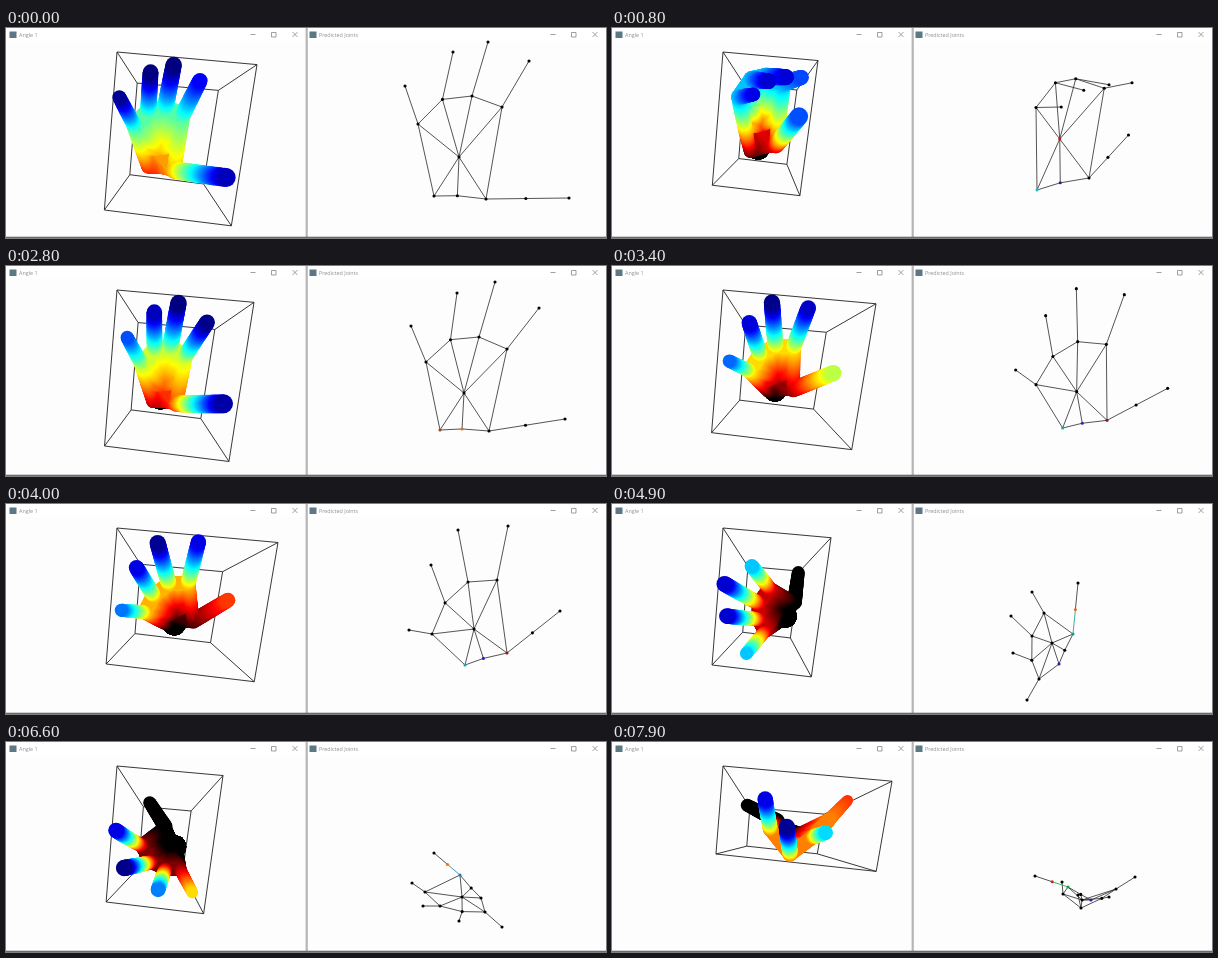
Animation, 600 px wide and 210 px high, one loop 8000 ms. Source, as an HTML page with a canvas:

```html
<!DOCTYPE html>
<html lang="en">
<head>
<meta charset="utf-8">
<title>Hand pose</title>
<style>
  html, body { margin: 0; width: 600px; height: 210px; overflow: hidden; background: #fdfdfd; }
  svg, canvas { position: absolute; left: 0; top: 0; width: 600px; height: 210px; }
  text { font: 5.4px "Open Sans", "Noto Sans", sans-serif; fill: #8c8c8c; }
  .icon { fill: #5c7884; }
  .buttons { fill: none; stroke: #777; stroke-width: .7; }
</style>
</head>
<body>
<svg viewBox="0 0 600 210">
  <defs>
    <g id="bar">
      <rect width="300" height="13" fill="#fff"/>
      <rect class="icon" x="3.5" y="3.5" width="7" height="6.5"/>
      <path class="buttons" d="M244.5 6.5h5M265.5 4.5h4.500v4.500h-4.500zM286.5 4l5 5m0-5l-5 5"/>
    </g>
  </defs>
  <use href="#bar"/>
  <use href="#bar" x="300"/>
  <text x="13" y="8.8">Angle 1</text>
  <text x="313" y="8.8">Predicted Joints</text>
  <rect x="299.5" width="1" height="209" fill="#c4c4c4"/>
  <rect x="300.5" width="1" height="209" fill="#8a8a8a"/>
  <rect y="208.7" width="600" height="1.3" fill="#6b6b6b"/>
</svg>
<canvas id="view" width="600" height="210"></canvas>
<script>
const ctx = document.getElementById('view').getContext('2d');
const LOOP = 8000, STEP = 100;

// hold: first and last ms of the pose. box: width, height, scale of the far side.
// fit: area that the hand fills. depth: five tips, knuckles, palm.
// joints: outer and inner heel, centre, pinky, middle and index knuckle, tips pinky to thumb.
const poses = [
  {
    hold: [0, 200], box: [140, 158, .58], fit: [113, 37, 221, 151],
    depth: [.02, 0, 0, .12, .06, .46, .72],
    joints: [428,168, 480,171, 453,129, 412,96, 466,68, 496,79,
             399,58, 447,24, 482,14, 523,33, 563,170],
    tint: {}
  },
  {
    hold: [1000, 1800], box: [80, 125, .54], fit: [126, 45, 180, 124],
    depth: [.13, .11, .12, .22, .25, .27, .97],
    joints: [424,160, 476,143, 446,105, 428,74, 463,45, 491,54,
             466,86, 480,75, 502,71, 519,62, 501,86],
    tint: { heel: '#12c8d8', midHeel: '#2020a0', centre: '#c01818' }
  },
  {
    hold: [2600, 2800], box: [137, 156, .56], fit: [118, 37, 218, 147],
    depth: [.2, .06, 0, .01, .04, .58, .83],
    joints: [434,164, 483,165, 458,127, 420,96, 473,71, 501,83,
             405,60, 451,27, 489,16, 533,42, 559,153],
    tint: { heel: '#a04818', midHeel: '#c87838' }
  },
  {
    hold: [3700, 4100], box: [161, 136, .51], fit: [111, 36, 236, 130],
    depth: [.24, .1, .02, .1, .82, .7, 1.06],
    joints: [459,161, 501,149, 468,125, 426,130, 462,78, 491,76,
             403,126, 425,61, 452,26, 502,22, 554,107],
    tint: { heel: '#18a8a0', midHeel: '#2828b0', thumbBase: '#802020' }
  },
  {
    hold: [4900, 4900], box: [108, 137, .48], fit: [111, 50, 192, 154],
    depth: [.32, .08, .08, .32, 1.2, .93, 1.16],
    joints: [447,160, 461,130, 440,139, 427,175, 420,132, 432,109,
             415,196, 401,149, 399,112, 420,88, 466,79],
    tint: { heel: '#2020c0', thumbBase: '#189888', thumb: '#e06820' }
  },
  {
    hold: [6600, 6600], box: [106, 136, .45], fit: [108, 38, 189, 161],
    depth: [.66, .25, .01, .1, 1.2, 1, 1.2],
    joints: [475,156, 454,133, 456,155, 479,170, 434,164, 419,150,
             496,185, 453,179, 417,164, 406,141, 428,111],
    tint: { thumbBase: '#1878b8', thumb: '#e87820' }
  },
  {
    hold: [7800, LOOP], box: [169, 88, .44], fit: [115, 42, 254, 114],
    depth: [.83, .34, .02, .1, 1.2, .75, 1.15],
    joints: [479,158, 456,145, 470,158, 504,147, 469,166, 451,152,
             523,135, 497,155, 466,153, 450,140, 423,134],
    tint: { heel: '#2020b0', thumbBase: '#18a048', thumb: '#d02020' }
  }
];

const names = ['heel', 'thumbBase', 'centre', 'pinky', 'middle', 'index',
  'pinkyTip', 'ringTip', 'middleTip', 'indexTip', 'thumbTip'];
const rim = ['heel', 'midHeel', 'thumbBase', 'index', 'middle', 'ring', 'pinky'];
const fingers = [['pinky', 'pinkyTip'], ['ring', 'ringTip'], ['middle', 'middleTip'],
  ['index', 'indexTip'], ['thumbBase', 'thumbTip']];
const fingerRadius = [7, 7.9, 8.2, 7.9, 9.6];

const mix = (a, b, k) => a + (b - a) * k;
const blend = (a, b, k) => a.map((v, i) => mix(v, b[i], k));
const after = i => rim[(i + 1) % rim.length];

function poseAt(t) {
  const i = poses.findLastIndex(p => p.hold[0] <= t);
  const a = poses[i], b = poses[i + 1] || a;
  const k = t <= a.hold[1] ? 0 : (t - a.hold[1]) / (b.hold[0] - a.hold[1]);
  const pose = { tint: (k < .5 ? a : b).tint };
  for (const key of ['box', 'fit', 'depth', 'joints']) pose[key] = blend(a[key], b[key], k);
  pose.joints = skeleton(pose.joints);
  return pose;
}

// Names the key joints and derives the ring knuckle, middle heel and thumb joint.
function skeleton(flat) {
  const j = Object.fromEntries(names.map((name, i) => [name, flat.slice(2 * i, 2 * i + 2)]));
  const fromCentre = (a, ka, b, kb) =>
    j.centre.map((c, i) => c + ka * (j[a][i] - c) + kb * (j[b][i] - c));
  j.ring = fromCentre('pinky', .6, 'middle', .62);
  j.midHeel = fromCentre('heel', .53, 'thumbBase', .43);
  j.thumb = blend(j.thumbBase, j.thumbTip, .48);
  return j;
}

// Jet ramp that runs on into black beyond the far end.
function depthColor(z) {
  const part = k => Math.round(255 * Math.max(0, Math.min(1, 1.5 - Math.abs(4 * z - k))));
  return `rgb(${part(3)},${part(2)},${part(1)})`;
}

function line(a, b) {
  ctx.beginPath();
  ctx.moveTo(...a);
  ctx.lineTo(...b);
  ctx.stroke();
}

function disc(x, y, r, color) {
  ctx.fillStyle = color;
  ctx.beginPath();
  ctx.arc(x, y, r, 0, 2 * Math.PI);
  ctx.fill();
}

// A tilted box hung from its top left corner; the far side shrinks to a vanishing point.
function drawBox([w, h, scale]) {
  const x = 111, y = 24, skew = w * h / 1700;
  const near = [[x, y], [x + w, y + .09 * w],
    [x + w - .08 * h - skew, y + .09 * w + h + skew / 4], [x - .08 * h, y + h]];
  const far = near.map(p => blend([159, 98], p, scale));
  ctx.strokeStyle = '#222';
  ctx.lineWidth = .9;
  near.forEach((p, i) => {
    line(p, near[(i + 1) % 4]);
    line(far[i], far[(i + 1) % 4]);
    line(p, far[i]);
  });
}

function drawHand({ joints, fit, depth }) {
  const [x0, y0, x1, y1] = fit;
  const [knuckle, palm] = depth.slice(5);
  const all = Object.values(joints);
  const scaleTo = (v, axis, from, to) => {
    const values = all.map(p => p[axis]), low = Math.min(...values), high = Math.max(...values);
    return mix(from, to, (v - low) / (high - low));
  };
  const point = (name, z) => {
    const [x, y] = joints[name];
    return [scaleTo(x, 0, x0, x1), scaleTo(y, 1, y0, y1), z];
  };

  const discs = [];
  const limb = (a, b, ra, rb) => {
    for (let i = 0; i <= 36; i++) {
      const [x, y, z] = blend(a, b, i / 36), near = 1 - .28 * z;
      discs.push({ x: mix(175, x, near), y: mix(105, y, near), z, r: mix(ra, rb, i / 36) * near });
    }
  };

  const heelDepth = { heel: palm + .12, midHeel: palm + .1, thumbBase: palm };
  const at = name => point(name, heelDepth[name] ?? knuckle);
  const centre = point('centre', palm);
  const wrist = blend(point('heel', 1.2), point('midHeel', 1.2), .5);
  limb(wrist, wrist, 17, 17);
  rim.forEach((name, i) => {
    const a = at(name), b = at(after(i));
    limb(centre, a, 13, 9);
    limb(centre, blend(a, b, .5), 13, 9);
    limb(a, b, 9, 9);
  });
  fingers.forEach(([base, tip], i) => {
    const r = fingerRadius[i];
    limb(at(base), point(tip, depth[i]), r + 1.5, r);
  });

  discs.sort((a, b) => b.z - a.z);
  for (const d of discs) disc(d.x, d.y, d.r, depthColor(d.z));
}

function drawSkeleton(joints, tint) {
  const bone = (a, b, color = '#2a2a2a') => {
    ctx.strokeStyle = color;
    line(joints[a], joints[b]);
  };
  ctx.lineWidth = .8;
  rim.forEach((name, i) => {
    bone(name, after(i));
    bone('centre', name);
  });
  fingers.slice(0, 4).forEach(([base, tip]) => bone(base, tip));
  bone('thumbBase', 'thumb', tint.thumb && tint.thumbBase);
  bone('thumb', 'thumbTip');
  for (const name in joints) disc(...joints[name], 1.55, tint[name] || '#000');
}

let shown = -1;
function frame() {
  const t = Math.floor(performance.now() % LOOP / STEP) * STEP;
  if (t !== shown) {
    shown = t;
    const pose = poseAt(t);
    ctx.clearRect(0, 0, 600, 210);
    drawBox(pose.box);
    drawHand(pose);
    drawSkeleton(pose.joints, pose.tint);
  }
  requestAnimationFrame(frame);
}
frame();
</script>
</body>
</html>
```
